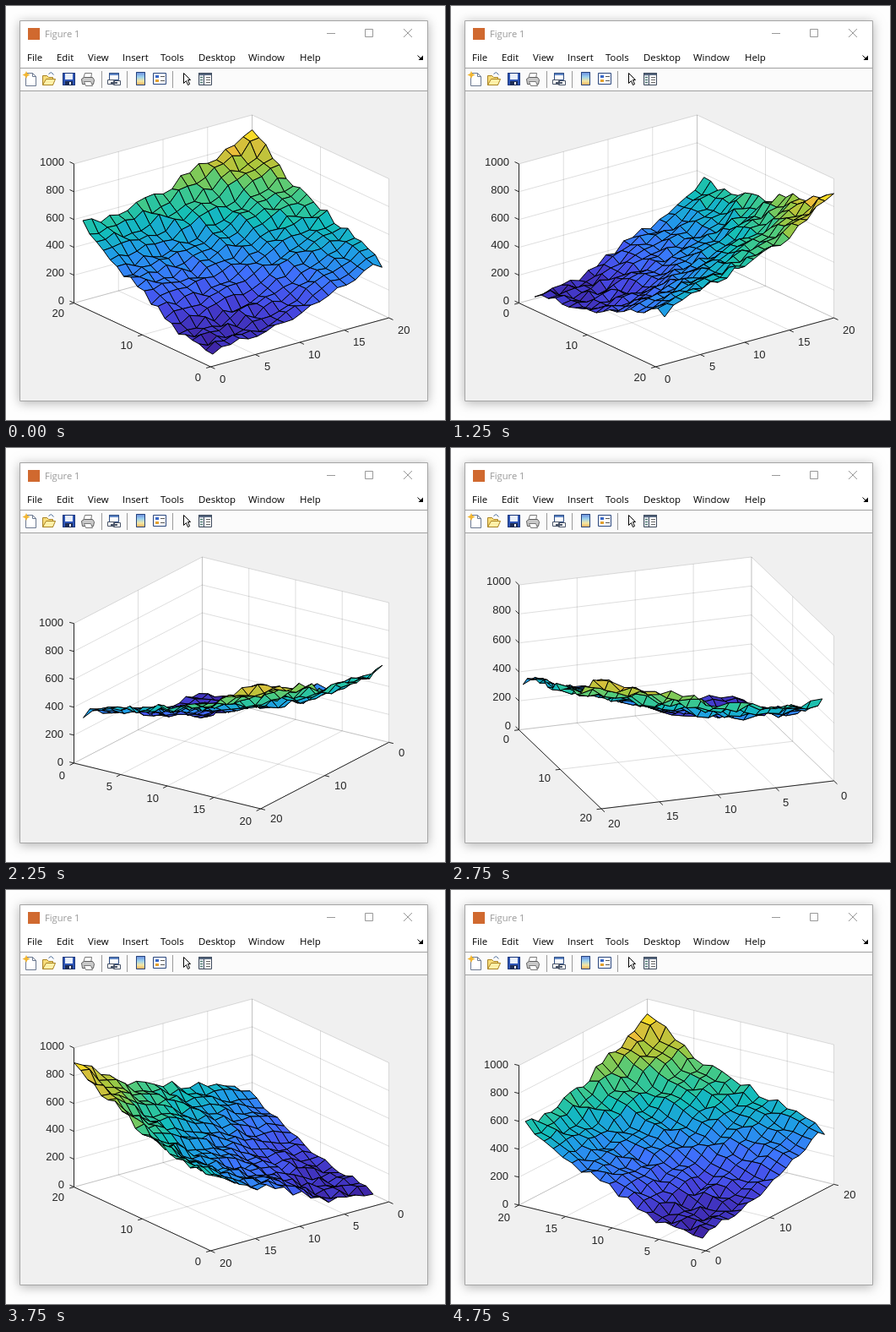
These frames come from a looping animation (520x490 px, 5 s). An HTML page with a canvas:

```html
<!DOCTYPE html>
<html lang="en">
<head>
<meta charset="utf-8">
<title>Rotating surface</title>
<style>
html, body { margin: 0; width: 520px; height: 490px; overflow: hidden; background: #fefefe; }
canvas { display: block; }
</style>
</head>
<body>
<canvas id="stage" width="520" height="490"></canvas>
<script>
const ctx = document.getElementById('stage').getContext('2d');
const N = 20, STEP_MS = 250, STEPS = 20;
const BOX = { left: 80.5, width: 373, bottom: 427, height: 298 };
const LOW = 42, HIGH = 893, ROUGHNESS = 64;
const INK = '#262626';
const PARULA = ['#3e26a8', '#474ae6', '#3e73fe', '#209be7', '#12beb9', '#4acb81', '#a5c73c', '#f5bb39', '#f9fb15']
  .map(hex => [1, 3, 5].map(k => parseInt(hex.slice(k, k + 2), 16)));

const mix = (a, b, t) => a + (b - a) * t;

// Piecewise linear curve through evenly spaced values.
function curve(values, t) {
  const p = t * (values.length - 1), k = Math.min(Math.floor(p), values.length - 2);
  return mix(values[k], values[k + 1], p - k);
}

function randomizer(seed) {
  return () => {
    seed = (seed * 1664525 + 1013904223) >>> 0;
    return seed / 4294967296;
  };
}

// Four border slopes blended inward, with seeded roughness on top.
function makeHeights() {
  const rand = randomizer(77);
  const x1 = t => curve([65, 90, 250, 360, 548], t);
  const x20 = t => curve([371, 480, 562, 690, 893], t);
  const y1 = t => curve([65, 90, 145, 283, 371], t);
  const y20 = t => curve([548, 550, 640, 755, 893], t);
  return Array.from({ length: N }, (_, i) => Array.from({ length: N }, (_, j) => {
    const u = i / (N - 1), v = j / (N - 1);
    const corners = mix(mix(x1(0), x20(0), u), mix(x1(1), x20(1), u), v);
    const slope = mix(x1(v), x20(v), u) + mix(y1(u), y20(u), v) - corners;
    return Math.max(LOW, Math.min(HIGH, slope + (rand() - 0.5) * ROUGHNESS));
  }));
}
const heights = makeHeights();

function faceColor(z) {
  const level = Math.floor((z - LOW) / (HIGH - LOW + 25) * 64) / 63;
  return `rgb(${[0, 1, 2].map(n => Math.round(curve(PARULA.map(c => c[n]), level)))})`;
}

function makeView(deg) {
  const a = deg * Math.PI / 180, c = Math.cos(a), s = Math.sin(a);
  const span = Math.abs(c) + Math.abs(s), tall = Math.cos(Math.PI / 6);
  const sx = BOX.width / span, sy = BOX.height / (span / 2 + tall);
  const minX = Math.min(0, c) + Math.min(0, s);
  const minY = (Math.min(0, -s) + Math.min(0, c)) / 2;
  const project = (u, v, w) => [
    BOX.left + sx * (c * u + s * v - minX),
    BOX.bottom - sy * ((c * v - s * u) / 2 - minY + tall * w)
  ];
  return {
    c, s, project,
    near: [s > 0 ? 1 : 0, c < 0 ? 1 : 0],
    left: [c < 0 ? 1 : 0, s < 0 ? 1 : 0],
    straight: Math.min(Math.abs(c), Math.abs(s)) < 0.1
  };
}

function path(points, close) {
  ctx.beginPath();
  points.forEach(p => ctx.lineTo(p[0], p[1]));
  if (close) ctx.closePath();
}

function line(color, ...points) {
  ctx.strokeStyle = color;
  path(points);
  ctx.stroke();
}

function rect(color, x, y, w, h) {
  ctx.fillStyle = color;
  ctx.fillRect(x, y, w, h);
}

function frame(color, x, y, w, h) {
  ctx.strokeStyle = color;
  ctx.strokeRect(x + 0.5, y + 0.5, w - 1, h - 1);
}

function shape(fill, stroke, points) {
  path(points, true);
  ctx.fillStyle = fill;
  ctx.fill();
  if (stroke) {
    ctx.strokeStyle = stroke;
    ctx.stroke();
  }
}

function text(str, x, y, font, color, align = 'left') {
  ctx.font = font;
  ctx.fillStyle = color;
  ctx.textAlign = align;
  ctx.fillText(str, x, y);
}

function tickLabel(value, x, y, align) {
  text(value, Math.round(x), Math.round(y + 4.7), '13px "Liberation Sans", Arial, sans-serif', INK, align);
}

function ticks(step, max) {
  return Array.from({ length: max / step + 1 }, (_, k) => k * step);
}

function drawAxes(view) {
  const { project, near, left, straight } = view;
  const far = [1 - near[0], 1 - near[1]];
  const right = [1 - left[0], 1 - left[1]];
  const reach = straight ? 15 : 11.5, mark = straight ? 8 : 5.5;
  const grid = 'rgba(38,38,38,.15)';
  const heading = (from, to) => {
    const a = project(...from, 0), b = project(...to, 0);
    const dx = b[0] - a[0], dy = b[1] - a[1], d = Math.hypot(dx, dy);
    return [dx / d, dy / d, d];
  };

  shape('#fff', null, [
    project(...left, 0), project(...left, 1), project(...far, 1),
    project(...right, 1), project(...right, 0), project(...near, 0)
  ]);

  const corner = axis => axis === 0 ? [far[0], near[1]] : [near[0], far[1]];
  const lengths = [0, 1].map(axis => heading(near, corner(axis))[2]);
  const steps = lengths[0] > lengths[1] ? [5, 10] : [10, 5];

  [0, 1].forEach(axis => {
    const at = (t, other) => axis === 0 ? [t, other] : [other, t];
    const o = 1 - axis;
    ticks(steps[axis], 20).forEach(value => {
      const t = value / 20;
      line(grid, project(...at(t, near[o]), 0), project(...at(t, far[o]), 0), project(...at(t, far[o]), 1));
    });
  });
  ticks(200, 1000).forEach(value => {
    const w = value / 1000;
    line(grid, project(...left, w), project(...far, w), project(...right, w));
  });

  [0, 1].forEach(axis => {
    const at = t => axis === 0 ? [t, near[1]] : [near[0], t];
    const [dx, dy] = heading(corner(1 - axis), near);
    line(INK, project(...at(0), 0), project(...at(1), 0));
    ticks(steps[axis], 20).forEach(value => {
      const [x, y] = project(...at(value / 20), 0);
      line(INK, [x, y], [x + dx * mark, y + dy * mark]);
      const align = Math.abs(dx) < 0.2 ? 'center' : dx > 0 ? 'left' : 'right';
      tickLabel(value, x + dx * reach, y + dy * reach + (dy > 0.05 ? 9 : 0), align);
    });
  });

  const [dx, dy] = heading(near, left);
  line(INK, project(...left, 0), project(...left, 1));
  ticks(200, 1000).forEach(value => {
    const [x, y] = project(...left, value / 1000);
    line(INK, [x, y], [x + dx * mark, y + dy * mark]);
    tickLabel(value, x + dx * reach - 1, y + dy * (straight ? 13 : 7), 'right');
  });
}

function drawSurface(view) {
  const { c, s, project } = view;
  const points = heights.map((row, i) => row.map((z, j) => project((i + 1) / 20, (j + 1) / 20, z / 1000)));
  const faces = [];
  for (let i = 0; i < N - 1; i++) {
    for (let j = 0; j < N - 1; j++) faces.push({ i, j, depth: s * i - c * j });
  }
  faces.sort((a, b) => a.depth - b.depth);
  faces.forEach(({ i, j }) => shape(faceColor(heights[i][j]), '#000',
    [points[i][j], points[i + 1][j], points[i + 1][j + 1], points[i][j + 1]]));
}

function drawToolbar() {
  // new document
  shape('#fff', '#6b7890', [[23.5, 79.5], [31.5, 79.5], [35.5, 83.5], [35.5, 94.5], [23.5, 94.5]]);
  line('#6b7890', [31.5, 79.5], [31.5, 83.5], [35.5, 83.5]);
  shape('#f2b632', null, Array.from({ length: 8 }, (_, k) => {
    const a = k * Math.PI / 4, r = k % 2 ? 2 : 4.5;
    return [24 + r * Math.cos(a), 81.5 + r * Math.sin(a)];
  }));
  // open folder
  shape('#f7dc7b', '#a98322', [[43.5, 93.5], [43.5, 82.5], [48.5, 82.5], [50.5, 84.5], [55.5, 84.5], [55.5, 93.5]]);
  shape('#fff0a8', '#a98322', [[43.5, 93.5], [47.5, 86.5], [58.5, 86.5], [55.5, 93.5]]);
  line('#4a6a96', [50.5, 80.5], [53.5, 78.5], [56.5, 81.5]);
  // disk
  rect('#2e55b5', 67, 79, 15, 15);
  frame('#173478', 67, 79, 15, 15);
  rect('#e9f0fb', 70, 80, 9, 7);
  rect('#1c2c55', 70, 89, 9, 5);
  rect('#fff', 75, 90, 2, 3);
  // printer
  shape('#fff', '#777', [[93.5, 79.5], [101.5, 79.5], [100.5, 86.5], [91.5, 86.5]]);
  shape('#c9c9c9', '#5e5e5e', [[89.5, 86.5], [92.5, 84.5], [102.5, 84.5], [104.5, 87.5], [103.5, 92.5], [90.5, 92.5]]);
  shape('#fff', '#777', [[92.5, 89.5], [100.5, 89.5], [102.5, 94.5], [94.5, 94.5]]);
  // link plot
  rect('#fff', 122, 79, 12, 9);
  rect('#5f86c6', 122, 79, 12, 3);
  frame('#2c4b80', 122, 79, 12, 9);
  frame('#4a5568', 120, 87, 9, 6);
  frame('#4a5568', 127, 88, 9, 6);
  rect('#4a5568', 124, 90, 8, 2);
  // color bar
  const fade = ctx.createLinearGradient(0, 79, 0, 94);
  ['#6f94df', '#9cd2ee', '#f7e7a1', '#eba752'].forEach((color, k) => fade.addColorStop(k / 3, color));
  rect(fade, 154, 78, 11, 16);
  frame('#26437a', 154, 78, 11, 16);
  // legend
  rect('#fff', 174, 79, 16, 14);
  frame('#29467d', 174, 79, 16, 14);
  ['#3868c8', '#e3a12d'].forEach((color, k) => {
    rect(color, 177, 82 + k * 5, 4, 3);
    rect('#555', 183, 83 + k * 5, 5, 1);
  });
  // pointer
  shape('#fff', '#000', [[210.5, 79.5], [210.5, 91.5], [213.5, 88.5], [215.5, 93.5], [217.5, 92.5], [215.5, 87.5], [218.5, 87.5]]);
  // inspector
  rect('#fff', 228, 79, 16, 15);
  rect('#54657d', 228, 79, 16, 3);
  frame('#3e4a5c', 228, 79, 16, 15);
  rect('#d8dde4', 229, 82, 5, 11);
  rect('#3e4a5c', 234, 82, 1, 11);
  [84, 87, 90].forEach(y => {
    rect('#477a68', 230, y, 3, 1);
    rect('#666', 237, y, 5, 1);
  });
  [113, 143, 197].forEach(x => rect('#9a9a9a', x, 77, 1, 20));
}

function drawWindow() {
  rect('#fefefe', 0, 0, 520, 490);
  ctx.save();
  ctx.shadowColor = 'rgba(0,0,0,.3)';
  ctx.shadowBlur = 12;
  ctx.shadowOffsetY = 2;
  rect('#fff', 16, 17, 484, 451);
  ctx.restore();
  rect('#fbfbfb', 17, 74, 482, 26);
  rect('#f0f0f0', 17, 101, 482, 366);
  rect('#a0a0a0', 17, 73, 482, 1);
  rect('#a0a0a0', 17, 100, 482, 1);
  frame('#a5a5a5', 16, 17, 484, 451);

  rect('#d0692f', 26, 26, 14, 14);
  const ui = '"Open Sans", "Noto Sans", sans-serif';
  text('Figure 1', 46, 37, `11.2px ${ui}`, '#999');
  Object.entries({ File: 25, Edit: 60, View: 97, Insert: 138, Tools: 183, Desktop: 228, Window: 287, Help: 348 })
    .forEach(([name, x]) => text(name, x, 65, `11.4px ${ui}`, '#000'));

  rect('#999', 380, 32, 10, 1);
  frame('#999', 425, 27, 10, 10);
  line('#999', [471, 27], [481, 37]);
  line('#999', [481, 27], [471, 37]);
  line('#000', [487.5, 58.5], [492.5, 63.5]);
  shape('#000', null, [[494, 58.5], [494, 64], [488.5, 64]]);
  drawToolbar();
}

function draw(step) {
  ctx.lineWidth = 1;
  ctx.lineJoin = 'round';
  drawWindow();
  const view = makeView(-37.5 + step * 360 / STEPS);
  drawAxes(view);
  drawSurface(view);
}

const start = performance.now();
let shown = -1;

function tick() {
  const step = Math.floor((performance.now() - start) / STEP_MS) % STEPS;
  if (step !== shown) {
    shown = step;
    draw(step);
  }
  requestAnimationFrame(tick);
}
tick();
</script>
</body>
</html>
```
